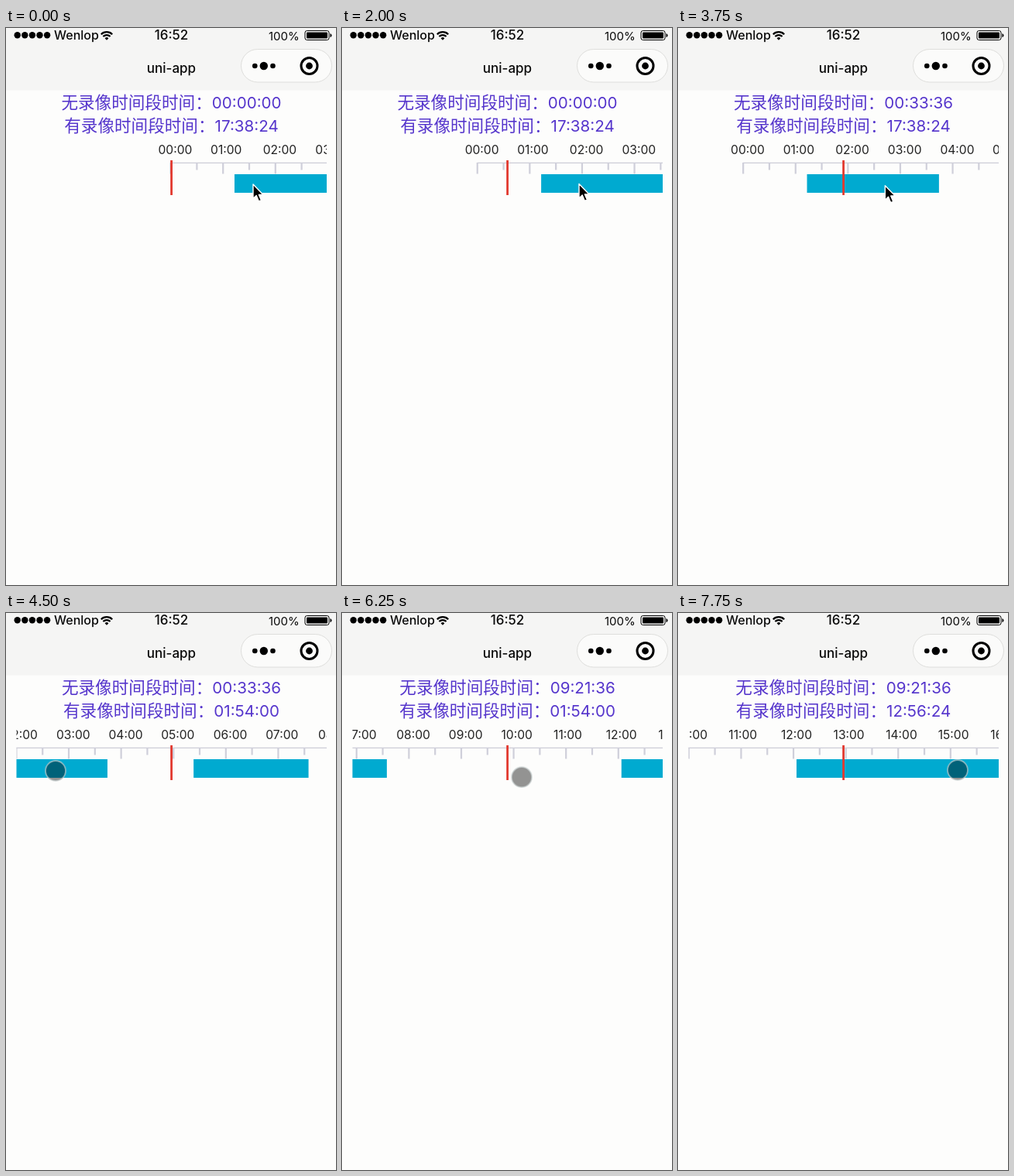
Recreate the animation shown at these times as an HTML page. Size 426x720 px, loop 8 s.

```html
<!DOCTYPE html>
<html lang="zh-CN">
<head>
<meta charset="utf-8">
<title>Timeline</title>
<style>
  html, body { margin: 0; width: 100%; height: 100%; overflow: hidden; background: #fdfdfc; }
  svg { display: block; width: 426px; height: 720px; }
  text { font-family: Inter, "Open Sans", sans-serif; fill: #0a0a0a; }
  .bar { font-size: 17px; font-weight: 500; }
  .mid { text-anchor: middle; }
  .info { font: 500 21.6px "Noto Sans CJK SC", "Noto Sans CJK", sans-serif; fill: #5535cc; text-anchor: middle; }
  .info tspan { font: 20.6px Inter, sans-serif; }
  .label { font-size: 15.6px; fill: #222; }
  .tick { fill: #cfcfda; }
  .clip { fill: #00aad0; }
</style>
</head>
<body>
<svg viewBox="0 0 426 720">
  <defs><clipPath id="view"><rect x="13.5" y="140" width="400.5" height="90"/></clipPath></defs>
  <rect width="426" height="720" fill="#fdfdfc"/>
  <rect width="426" height="80.5" fill="#f5f5f4"/>

  <g id="signal"></g>
  <text class="bar" x="62" y="15" style="font-size:16px">Wenlop</text>
  <g fill="none" stroke="#000" stroke-width="2.2">
    <path d="M122.800 8.200a10.200 10.200 0 0 1 14.400 0M125.400 11a6.500 6.500 0 0 1 9.200 0"/>
    <path d="M127.600 13.200a3.500 3.500 0 0 1 4.800 0L130 15.800z" fill="#000" stroke="none"/>
  </g>
  <text class="bar mid" x="213.5" y="15">16:52</text>
  <text x="339" y="16" style="font-size:15px">100%</text>
  <rect x="386" y="3.5" width="31" height="12" rx="2.5" fill="none" stroke="#000"/>
  <rect x="388" y="5.5" width="27" height="8" rx="1"/>
  <path d="M418.500 7v5q2-.5 2-2.500t-2-2.500"/>

  <text class="bar mid" x="213.5" y="57.5">uni-app</text>
  <rect x="303.5" y="27.5" width="117" height="42.5" rx="21.25" fill="#fbfbfa" stroke="#dededc"/>
  <circle cx="321.300" cy="49" r="3.3"/>
  <circle cx="332.800" cy="49" r="5.2"/>
  <circle cx="344.500" cy="49" r="3.3"/>
  <circle cx="391.500" cy="49" r="10.5" fill="none" stroke="#000" stroke-width="3"/>
  <circle cx="391.500" cy="49" r="4.4"/>

  <text class="info" x="213.5" y="104">无录像时间段时间：<tspan id="gapTime"></tspan></text>
  <text class="info" x="213.5" y="134">有录像时间段时间：<tspan id="recTime"></tspan></text>

  <g clip-path="url(#view)"><g id="track"></g></g>
  <rect x="212.200" y="171" width="2.8" height="45" fill="#e23a30"/>

  <circle id="touch" r="13" fill="#000" fill-opacity=".42" stroke="#c8d0d0" stroke-opacity=".65" stroke-width="1.8"/>
  <path id="arrow" d="M0 0V18.500L4.200 14.600 7.300 22 10.500 20.700 7.400 13.400H13Z"
        stroke="#fff" stroke-width="1.4" stroke-linejoin="round"/>
</svg>
<script>
  const LOOP = 8000, STEP = 250, HOUR = 67.6, CENTER = 212.5;
  const SETTLE = 370; // pause before a reading is shown
  const clips = [[1.22, 3.74], [5.385, 7.58], [12.06, 16.6]];

  // The finger goes down and up at `touch`; the track scrolls during `scroll`.
  const swipes = [
    { touch: [500, 1250], from: [297, 203], to: [278, 203], scroll: [500, 2000], hour: .56 },
    { touch: [2750, 3250], from: [334, 200], to: [262, 203], scroll: [2750, 3750], hour: 1.9 },
    { touch: [4000, 4500], from: [270, 204], to: [64, 204], scroll: [4000, 5140], hour: 9.36 },
    { touch: [5500, 6750], from: [343, 220], to: [158, 207], scroll: [5900, 7378], hour: 12.94 },
    { touch: [7750, LOOP], from: [361, 203], to: [361, 203], scroll: [LOOP, LOOP + 1], hour: 12.94 }
  ];
  const path = [{ ms: 0, at: [319, 202] }, ...swipes.flatMap(s => [
    { ms: s.touch[0], at: s.from }, { ms: s.touch[1], at: s.to }
  ])];

  const $ = id => document.getElementById(id);
  const pad = n => String(n).padStart(2, '0');
  const lerp = (a, b, f) => a + (b - a) * f;
  const progress = (a, b, v) => Math.min(1, Math.max(0, (v - a) / (b - a)));
  const ease = p => p * p * (3 - 2 * p);

  function clock(hours) {
    const s = Math.round(hours * 3600);
    return [s / 3600, s / 60 % 60, s % 60].map(n => pad(Math.floor(n))).join(':');
  }

  function add(parent, tag, attrs, text) {
    const el = document.createElementNS('http://www.w3.org/2000/svg', tag);
    for (const k in attrs) el.setAttribute(k, attrs[k]);
    if (text) el.textContent = text;
    parent.append(el);
  }

  function build(track) {
    for (let i = 0; i < 5; i++) add($('signal'), 'circle', { cx: 14.7 + 9.6 * i, cy: 9.2, r: 4.2 });
    add(track, 'rect', { class: 'tick', y: 173.7, width: 24 * HOUR, height: 1.4 });
    for (let i = 0; i <= 48; i++) {
      const x = i / 2 * HOUR, whole = i % 2 === 0;
      add(track, 'rect', { class: 'tick', x: x - 1, y: 174, width: 2.2, height: whole ? 14.5 : 9.5 });
      if (whole) add(track, 'text', { class: 'label', x: x - 16, y: 163.3 }, pad(i / 2) + ':00');
    }
    for (const [from, to] of clips)
      add(track, 'rect', { class: 'clip', x: from * HOUR, y: 189, width: (to - from) * HOUR, height: 24 });
  }

  function pointer(ms) {
    const i = path.findIndex(p => p.ms > ms), a = path[i - 1], b = path[i];
    const f = progress(a.ms, b.ms, ms);
    return a.at.map((v, k) => lerp(v, b.at[k], f));
  }

  function render(ms) {
    let hour = 0, gap = 0, rec = 17.64;
    for (const s of swipes) {
      hour = lerp(hour, s.hour, ease(progress(...s.scroll, ms)));
      if (ms < s.scroll[1] + SETTLE) continue;
      if (clips.some(([from, to]) => s.hour >= from && s.hour <= to)) rec = s.hour;
      else gap = s.hour;
    }
    $('gapTime').textContent = clock(gap);
    $('recTime').textContent = clock(rec);
    $('track').setAttribute('transform', `translate(${CENTER - hour * HOUR} 0)`);

    const down = swipes.some(({ touch }) => ms >= touch[0] && ms <= touch[1]);
    for (const [id, shown] of [['touch', down], ['arrow', !down]]) {
      $(id).setAttribute('transform', `translate(${pointer(ms).join(' ')})`);
      $(id).style.display = shown ? '' : 'none';
    }
  }

  build($('track'));
  const start = performance.now();
  function tick() {
    const ms = (performance.now() - start) % LOOP;
    render(Math.floor(ms / STEP) * STEP);
    requestAnimationFrame(tick);
  }
  tick();
</script>
</body>
</html>
```
